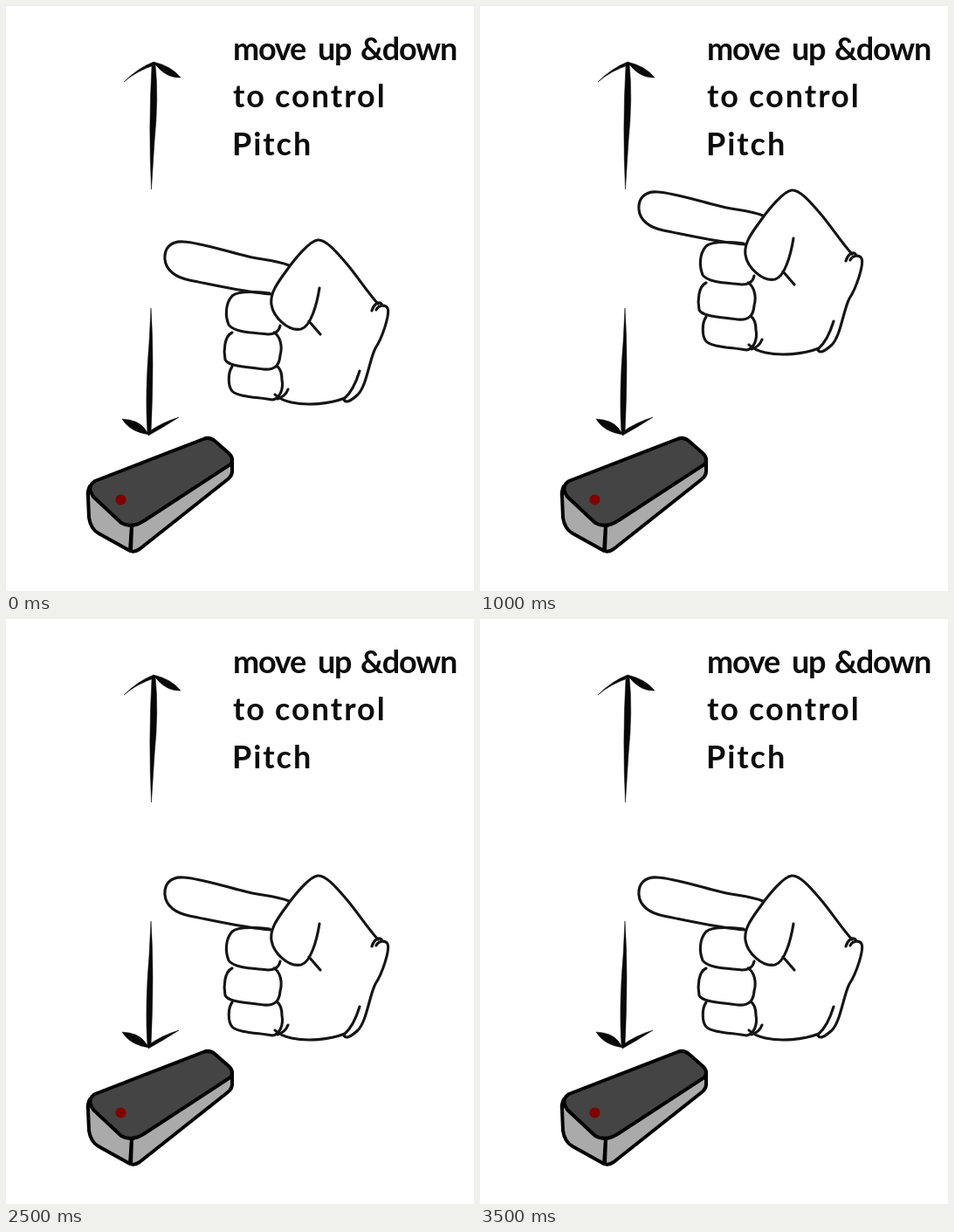
Write an HTML page without scripts that moves like this. It is 536x670 px and loops after 4 s.

```html
<!DOCTYPE html>
<html lang="en">
<head>
<meta charset="utf-8">
<title>Pitch control</title>
<style>
  html, body { margin: 0; width: 100%; height: 100%; overflow: hidden; background: #fff; }
  svg { display: block; width: 536px; height: 670px; }
  text { font: 700 36px Lato, sans-serif; letter-spacing: 2px; fill: #0c0c0c; }
  .tight { letter-spacing: -1.2px; }
  .arrow { fill: #080808; stroke: #080808; stroke-width: .5; }
  .remote { stroke: #000; stroke-width: 4; stroke-linejoin: round; }
  .hand {
    fill: none; stroke: #151515; stroke-width: 3.1;
    stroke-linecap: round; stroke-linejoin: round;
    animation: wave 4s step-end infinite;
  }
  @keyframes wave {
    0%, 50%, 100% { transform: translateY(0); }
    12.5%, 37.5% { transform: translateY(-22px); }
    25% { transform: translateY(-57px); }
    62.5%, 87.5% { transform: translateY(26px); }
    75% { transform: translate(-.5px, 54px); }
  }
</style>
</head>
<body>
<svg viewBox="0 0 536 670">
  <text class="tight" y="62"><tspan x="260">move</tspan> <tspan x="357">up</tspan> <tspan x="406">&amp;down</tspan></text>
  <text y="116"><tspan x="260">to</tspan> <tspan x="308">control</tspan></text>
  <text x="259" y="171">Pitch</text>

  <g class="arrow">
    <path d="M166.500 210Q163 140 167 68L171 66Q175 105 170 155Z"/>
    <path d="M135 87Q151 71 169 64L172 67Q150 74 135 87Z"/>
    <path d="M169 64Q190 69 200 82Q184 83 171 67Z"/>
    <path d="M166 346Q170 405 166 489H162Q159 445 164 385Z"/>
    <path d="M133 473Q151 474 158 483L164 491Q142 488 133 473Z"/>
    <path d="M163 492Q181 482 198 471Q178 477 163 488Z"/>
  </g>

  <g class="remote">
    <path fill="#aaa" d="M96 550Q93 556 94 562L95 586Q97 599 106 604L142 624L144 596Z"/>
    <path fill="#aaa" d="M144 596L259 522V533Q259 538 254 542L153 622Q147 626 143 624Z"/>
    <path fill="#444" d="M102 544L226 496Q233 493 239 498L255 512Q262 519 257 525L159 589Q144 599 132 592L100 562Q92 550 102 544Z"/>
    <circle cx="131.500" cy="565.500" r="6" fill="#800000" stroke="none"/>
  </g>

  <g class="hand">
    <!-- index finger -->
    <path d="M324 297C307 290 290 291 270 285C245 279 222 271 203 270C188 269 181 278 182 290C183 303 195 311 210 314C245 321 275 328 303 330"/>
    <!-- thumb and back of the hand -->
    <path d="M359 323C356 342 349 367 338 370C323 373 306 356 304 342C302 328 312 316 322 302C332 288 348 269 357 268C366 267 378 281 390 295C402 309 414 328 426 341M347 361L360 376"/>
    <!-- wrist -->
    <path d="M419 349C421 342 426 338 430 341M424 348C426 343 434 341 437 346C440 353 431 380 423 392C416 406 413 435 403 445Q390 457 387 451M405 418C401 431 396 442 388 449C370 456 345 458 327 454C318 452 312 449 308 445M323 439Q320 447 311 450"/>
    <!-- folded fingers -->
    <path d="M302 329C285 327 266 326 259 332C251 341 251 355 255 365C261 374 284 374 300 376Q312 376 314 366"/>
    <path d="M259 374C250 378 249 395 251 405C255 413 275 413 295 416C308 417 313 412 314 400C317 390 314 378 307 374"/>
    <path d="M259 413C254 420 254 435 259 441C266 448 290 448 305 451C314 450 318 438 316 428Q316 417 311 413"/>
  </g>
</svg>
</body>
</html>
```
